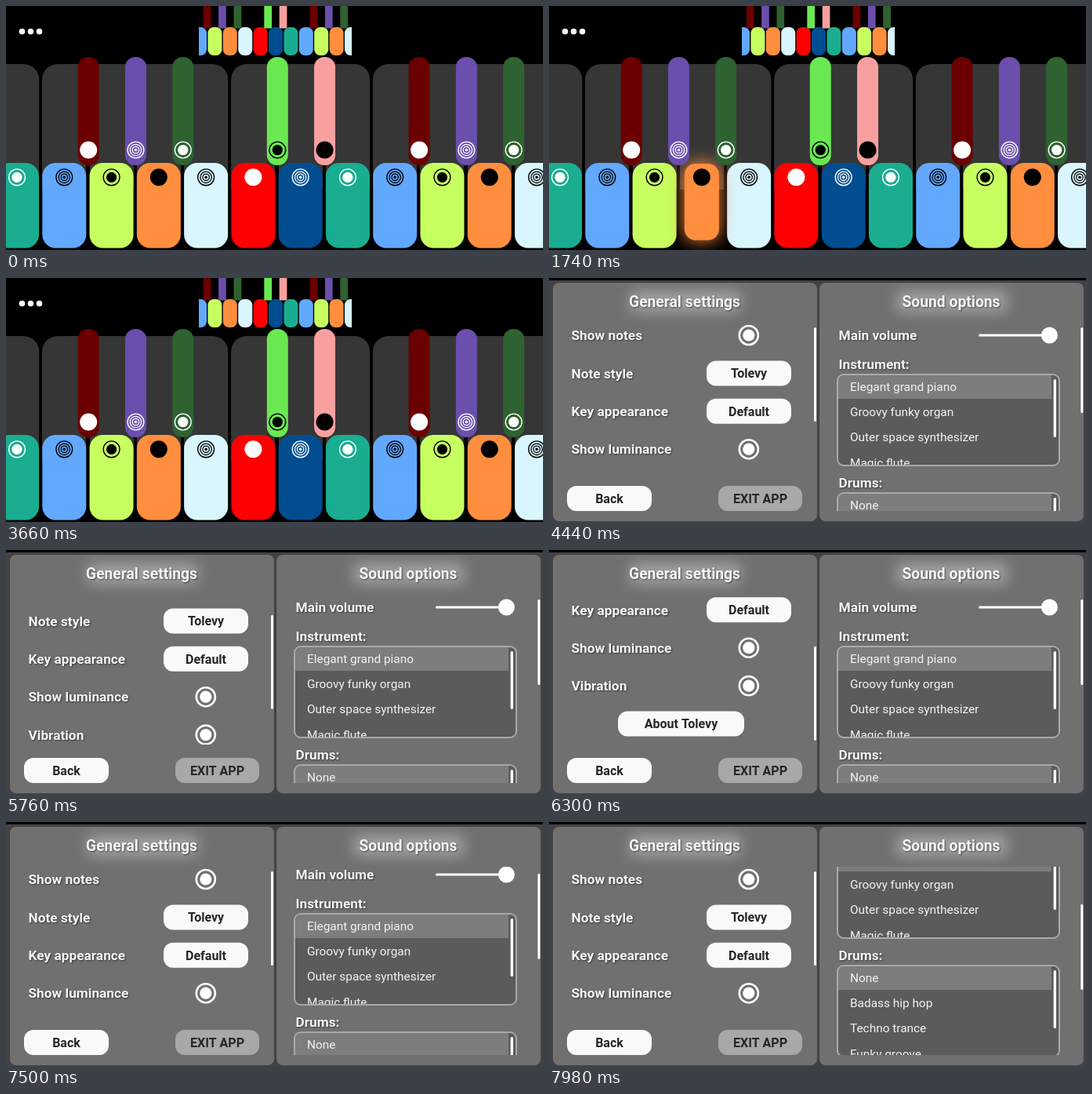
An HTML page with a canvas for the animation above (8000 ms loop, 685 px wide and 311 px high).

```html
<!DOCTYPE html>
<html lang="en">
<head>
<meta charset="utf-8">
<title>Colour piano</title>
<style>
html, body { margin: 0; width: 100%; height: 100%; overflow: hidden; background: #000; }
canvas { display: block; }
</style>
</head>
<body>
<canvas id="stage" width="685" height="311"></canvas>
<script>
const ctx = document.getElementById('stage').getContext('2d');
const LOOP = 8000, STEP = 60, SETTINGS_AT = 4440;
const APP = 'Tolevy';

// Colour, symbol, symbol colour; one octave starting at the blue key
const WHITE = [
  ['#62a8ff', 'rings', '#000'], ['#c8ff60', 'ring', '#000'], ['#ff8e3e', 'disc', '#000'],
  ['#d9f6ff', 'rings', '#000'], ['#ff0000', 'disc', '#fff'], ['#004d8f', 'rings', '#fff'],
  ['#1aad90', 'ring', '#fff']
];
const BLACK = [
  ['#6a0000', 'disc', '#fff'], ['#6a4fad', 'rings', '#fff'], ['#2f6231', 'ring', '#fff'], null,
  ['#6ae852', 'ring', '#000'], ['#f8a0a0', 'disc', '#000'], null
];

// Time, then the keys held from that time on
const NOTES = [
  [600, 'w6', 'w7'], [660],
  [840, 'w6'], [900, 'w4', 'w5'], [1020],
  [1260, 'w2', 'w4'], [1380],
  [1620, 'w1', 'w2'], [1740, 'w2'], [1800, 'w4'], [1860],
  [2100, 'w4', 'w5'], [2160],
  [2400, 'b1'], [2460, 'b2'], [2580], [2640, 'b4'], [2760, 'b5'], [2820], [2940, 'w7'], [3060],
  [3300, 'w5', 'w7'], [3420],
  [3600, 'w3', 'w5'], [3660]
];

const LEFT_SCROLL = [
  [5700, 0], [5760, 31], [5820, 68], [5880, 92], [5940, 103], [6000, 106], [6120, 100],
  [6300, 93.5], [6540, 93], [6600, 86], [6660, 42], [6720, 0], [6780, -11],
  [6840, -14], [7020, -5], [7200, 0]
];
const RIGHT_SCROLL = [[7440, 0], [7500, 6], [7980, 91]];

function valueAt(points, t) {
  const n = points.findIndex(p => p[0] > t);
  if (n === 0) return points[0][1];
  if (n < 0) return points[points.length - 1][1];
  const [t0, a] = points[n - 1], [t1, b] = points[n];
  return a + (b - a) * (t - t0) / (t1 - t0);
}

function box(x, y, w, h, r, fill) {
  ctx.beginPath();
  ctx.roundRect(x, y, w, h, r);
  ctx.fillStyle = fill;
  ctx.fill();
}

function disc(x, y, r, fill) {
  ctx.beginPath();
  ctx.arc(x, y, r, 0, 7);
  ctx.fillStyle = fill;
  ctx.fill();
}

function ring(x, y, r, width, color) {
  ctx.beginPath();
  ctx.arc(x, y, r, 0, 7);
  ctx.lineWidth = width;
  ctx.strokeStyle = color;
  ctx.stroke();
}

function clipped(x, y, w, h, r, draw) {
  ctx.save();
  ctx.beginPath();
  ctx.roundRect(x, y, w, h, r);
  ctx.clip();
  draw();
  ctx.restore();
}

function text(str, x, y, size, color, align = 'left', weight = 'bold') {
  ctx.font = `${weight} ${size}px Roboto, sans-serif`;
  ctx.textAlign = align;
  ctx.fillStyle = color;
  ctx.fillText(str, x, y + size * 0.36);
}

function label(str, x, y, size = 17.3, align) {
  ctx.save();
  ctx.shadowColor = 'rgba(0,0,0,.5)';
  ctx.shadowBlur = 2;
  ctx.shadowOffsetX = ctx.shadowOffsetY = 1;
  text(str, x, y, size, '#f4f4f4', align);
  ctx.restore();
}

function symbol(kind, x, y, color) {
  if (kind === 'disc') return disc(x, y, 11, color);
  ring(x, y, 10.4, 1.4, color);
  if (kind === 'ring') return disc(x, y, 6.6, color);
  ring(x, y, 7.2, 1.3, color);
  ring(x, y, 4.2, 1.3, color);
  disc(x, y, 1.8, color);
}

function key([color, kind, ink], x, y, w, h, r, symbolY, pressed) {
  if (pressed) {
    ctx.save();
    ctx.shadowColor = color;
    ctx.shadowBlur = 22;
    box(x - w / 2 + 6, y + 1, w - 12, h - 11, r - 3, color);
    ctx.restore();
  } else {
    box(x - w / 2, y, w, h, r, color);
  }
  symbol(kind, x, symbolY, ink);
}

function piano(t) {
  const held = (NOTES.filter(n => n[0] <= t).pop() || []).slice(1);
  const at = i => 74.3 + 60.27 * i;

  for (const x of [20.5, 31.5, 42.5]) disc(x, 32.5, 3.8, '#fff');

  clipped(246, 0, 195, 64, 0, () => {
    for (let i = 0; i < 11; i++) {
      const sharp = BLACK[i % 7];
      box(238 + 19.4 * i, 27, 18, 36, 7.5, WHITE[i % 7][0]);
      if (sharp) box(251.7 + 19.4 * i, -8, 9.7, 36.5, 1, sharp[0]);
    }
  });

  for (const [first, count] of [[-3, 3], [0, 4], [4, 3], [7, 4]])
    box(at(first) - 28.3, 74, 60.27 * count - 3.7, 160, [20, 20, 0, 0], '#363636');
  for (let i = -1; i < 11; i++) ctx.clearRect(at(i) + 28, 200, 4.3, 111);

  const order = [...Array(12).keys()].map(n => n - 1);
  order.sort((a, b) => held.includes('w' + a) - held.includes('w' + b));
  for (const i of order)
    key(WHITE[(i + 7) % 7], at(i), 200, 56, 108.5, 17, 218.3, held.includes('w' + i));
  for (let i = 0; i < 10; i++) {
    const sharp = BLACK[i % 7];
    if (sharp) key(sharp, at(i) + 30.9, 65, 27, 138, 13, 183.5, held.includes('b' + i));
  }
}

function button(str, x, y, w, fill = '#f9f9f9') {
  box(x, y - 16, w, 32, 12, fill);
  text(str, x + w / 2, y, 16, '#262626', 'center');
}

function toggle(y) {
  ring(254.8, y, 12, 2.6, '#fff');
  disc(254.8, y, 7.6, '#fff');
}

function panel(x, title) {
  box(x, 6, 337, 304, 8, '#707070');
  clipped(x, 6, 337, 304, 8, () => {
    ctx.filter = 'blur(9px)';
    box(x + 98, 17, 142, 26, 8, 'rgba(255,255,255,.36)');
    ctx.filter = 'none';
  });
  label(title, x + 168, 30, 19.3, 'center');
}

function list(title, y, items) {
  label(title, 369.5, y - 12);
  box(368, y + 1, 283, 116, 8, '#5b5b5b');
  clipped(369, y + 2, 281, 114, 7, () => {
    box(369, y + 2, 272, 30, 0, '#7d7d7d');
    items.forEach((item, i) => text(item, 384, y + 16.3 + 32.3 * i, 15.4, '#f2f2f2', 'left', 'normal'));
    box(643.6, y + 7, 3.4, 74, 2, '#fff');
  });
  ctx.beginPath();
  ctx.roundRect(368, y + 1, 283, 116, 8);
  ctx.lineWidth = 2;
  ctx.strokeStyle = '#a9a9a9';
  ctx.stroke();
}

function settings(t) {
  const left = valueAt(LEFT_SCROLL, t), right = valueAt(RIGHT_SCROLL, t);
  box(0, 3, 685, 308, 0, '#424242');

  panel(5, 'General settings');
  clipped(20, 57, 316, 191, 0, () => {
    const row = i => 73 + 48.4 * i - left;
    ['Show notes', 'Note style', 'Key appearance', 'Show luminance', 'Vibration']
      .forEach((name, i) => label(name, 28.5, row(i)));
    [0, 3, 4].forEach(i => toggle(row(i)));
    button(APP, 201, row(1), 108);
    button('Default', 201, row(2), 108);
    button('About ' + APP, 88, row(5), 161);
  });
  box(338, 63 + Math.max(0, Math.min(93.5, left)) * 0.64, 3, 120, 1.5, '#fff');
  button('Back', 23, 281, 108);
  button('EXIT APP', 216, 281, 107, '#a8a8a8');

  panel(345, 'Sound options');
  clipped(360, 57, 300, 240, 0, () => {
    label('Main volume', 369.5, 73 - right);
    box(548, 71.5 - right, 90, 3, 1.5, '#fff');
    disc(638.4, 73 - right, 10.5, '#fff');
    list('Instrument:', 122 - right,
      ['Elegant grand piano', 'Groovy funky organ', 'Outer space synthesizer', 'Magic flute']);
    list('Drums:', 273 - right,
      ['None', 'Badass hip hop', 'Techno trance', 'Funky groove']);
  });
  box(678.3, 63 + right * 0.46, 3, 109, 1.5, '#fff');
}

function frame() {
  const t = Math.floor(performance.now() % LOOP / STEP) * STEP;
  ctx.clearRect(0, 0, 685, 311);
  (t < SETTINGS_AT ? piano : settings)(t);
  requestAnimationFrame(frame);
}
frame();
</script>
</body>
</html>
```
